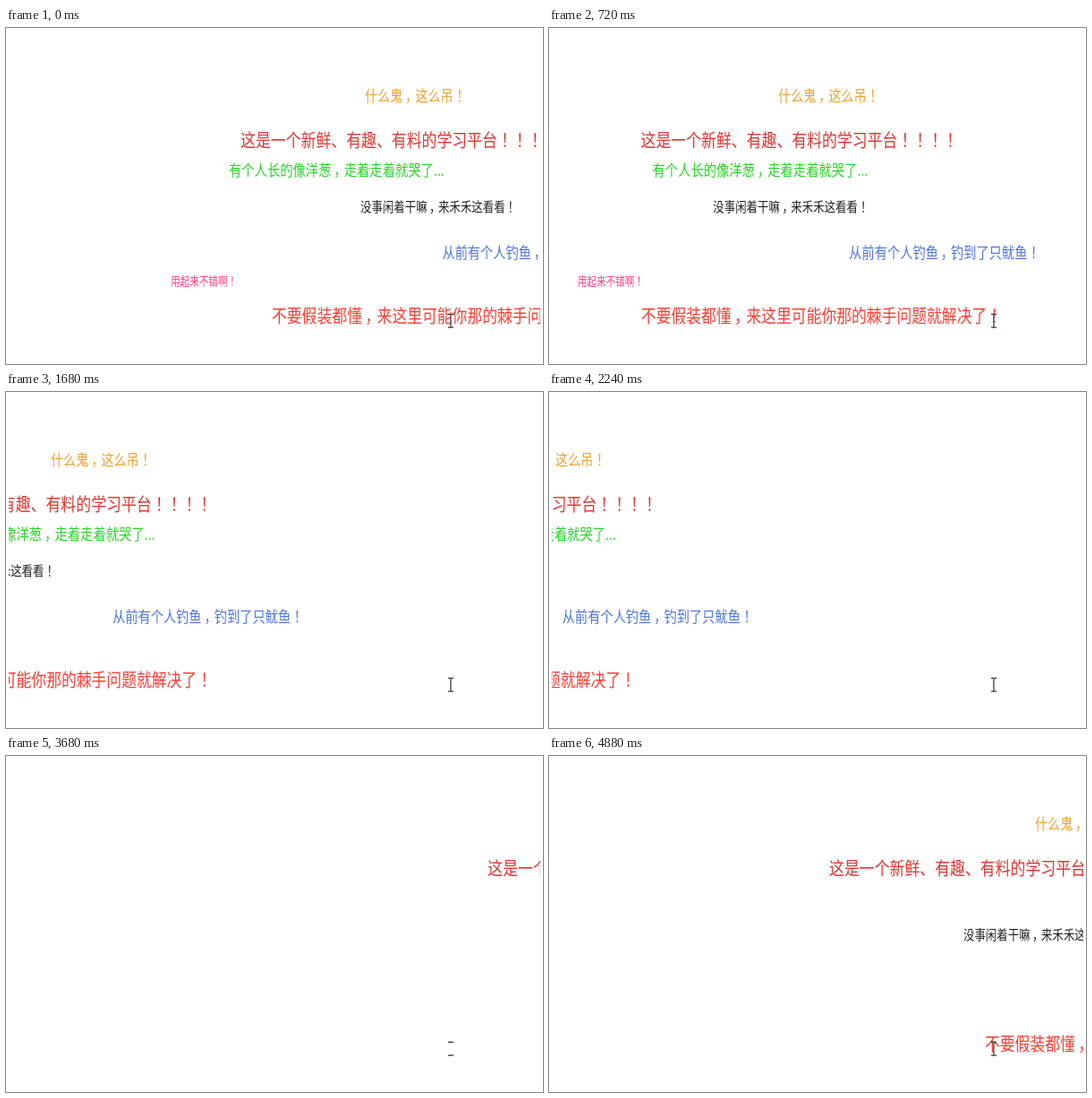
Recreate the animation shown at these times as an HTML page. Size 600 by 375 pixels, loop 5.04 s.

```html
<!DOCTYPE html>
<html lang="zh-CN">
<head>
<meta charset="utf-8">
<title>弹幕</title>
<style>
html, body { margin: 0; width: 100%; height: 100%; overflow: hidden; background: #fff; }
#stage { position: absolute; left: 3px; top: 0; width: 594px; height: 375px; overflow: hidden; }
.line {
  position: absolute; left: 0; white-space: pre; line-height: 30px;
  font-family: "Noto Sans CJK SC", "Noto Sans CJK", sans-serif; font-weight: 300;
  transform-origin: 0 50%;
}
.line i { font-style: normal; }
.line .mark { font-family: "Noto Sans CJK JP", "Noto Sans CJK SC", sans-serif; }
.line .comma { position: relative; left: .2em; }
#cursor { position: absolute; left: 0; top: 0; }
</style>
</head>
<body>
<div id="stage"></div>
<svg id="cursor" width="600" height="375" fill="none" stroke="#333">
  <path d="M494 319.4h6M494 334.2h6" stroke-width="1.3"/>
  <path id="stem" d="M496.9 319v15" stroke="#555" stroke-width="1.5"/>
</svg>
<script>
const LOOP = 5040, FRAME = 80, LAST = 4880;
const SQUEEZE = 0.84;   // letters are narrower than tall
const TURN = 36;        // progress at which lines move to their second pass

// time in ms -> scroll progress; the pace is slightly uneven
const pace = [[0, 0], [720, 9], [1040, 13], [1680, 21.8], [2960, 35.9],
              [3360, 40.5], [4240, 49.8], [4480, 52.8], [LAST, 56.6]];
const END = pace[pace.length - 1][1];

// x: start of first pass, v: px per unit of progress, back: x at the loop's end
const lines = [
  { text: '什么鬼，这么吊！', color: '#eda22e', size: 16.8, y: 75.5, x: 401, v: 16.1, back: 543 },
  { text: '这是一个新鲜、有趣、有料的学习平台！！！！', color: '#e03632', size: 20.1, y: 126.5, x: 262, v: 17.72, back: 313 },
  { text: '有个人长的像洋葱，走着走着就哭了...', color: '#26d626', size: 17.05, y: 158.5, x: 249, v: 14.83 },
  { text: '没事闲着干嘛，来禾禾这看看！', color: '#222', size: 14.8, y: 199.5, x: 396, v: 23.63, back: 463 },
  { text: '从前有个人钓鱼，钓到了只鱿鱼！', color: '#4d74e3', size: 16.95, y: 251, x: 487.4, v: 16.9 },
  { text: '用起来不错啊！', color: '#ff3a84', size: 12.6, y: 283, x: 184, v: 16.9 },
  { text: '不要假装都懂，来这里可能你那的棘手问题就解决了！', color: '#fa3e34', size: 20, y: 322, x: 297, v: 21.57, back: 487 }
];

const stage = document.getElementById('stage');
const stem = document.getElementById('stem');

for (const line of lines) {
  const el = line.el = document.createElement('div');
  el.className = 'line';
  el.innerHTML = line.text
    .replace(/！+/, '<i class="mark" lang="ja">$&</i>')
    .replace('，', '<i class="comma">，</i>');
  el.style.color = line.color;
  el.style.fontSize = line.size + 'px';
  el.style.top = line.y - 15 - line.size * 0.056 + 'px';
  stage.append(el);
}

function progress(t) {
  const i = Math.max(1, pace.findIndex(p => p[0] >= t));
  const [t0, s0] = pace[i - 1], [t1, s1] = pace[i];
  return s0 + (s1 - s0) * (t - t0) / (t1 - t0);
}

function draw(now) {
  const t = Math.min(LAST, Math.floor(now % LOOP / FRAME) * FRAME);
  const s = progress(t);
  for (const { el, x, v, back } of lines) {
    const left = back && s > TURN ? back + v * (END - s) : x - v * s;
    el.style.transform = `translateX(${left - 3}px) scaleX(${SQUEEZE})`;
  }
  stem.style.visibility = t >= 2640 && t < 4400 ? 'hidden' : 'visible';
}

let start;
function tick(now) {
  start ??= now;
  draw(now - start);
  requestAnimationFrame(tick);
}
draw(0);
requestAnimationFrame(tick);
</script>
</body>
</html>
```
